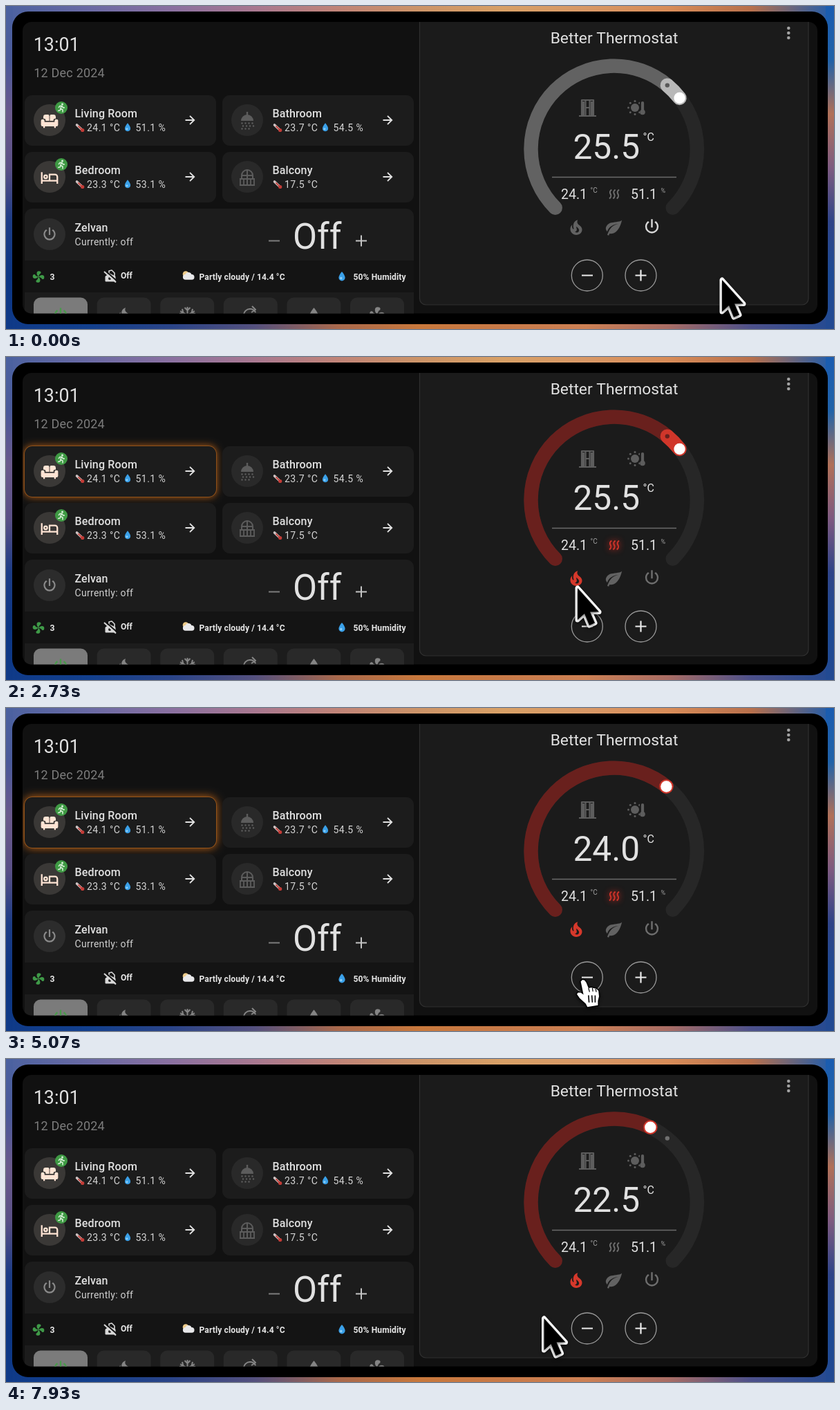
Recreate the animation shown at these times as an HTML page with a canvas. Size 1198 by 467 pixels, loop 8 s.

```html
<!DOCTYPE html>
<html lang="en">
<head>
<meta charset="utf-8">
<title>Thermostat dashboard</title>
<style>
html, body { margin: 0; width: 100%; height: 100%; overflow: hidden; background: #000; }
canvas { display: block; width: 1198px; height: 467px; }
</style>
</head>
<body>
<canvas id="stage" width="1198" height="467"></canvas>
<script>
const c = document.getElementById('stage').getContext('2d');
const LOOP = 8000, TAU = Math.PI * 2;
const HEAT_ON = 1700, HEAT_IDLE = 7000;
const CLICKS = [4060, 4480, 4900, 5310, 5720, 6150];
const CX = 879.7, CY = 206.8, R = 120.2;

const ICONS = {
  power: 'M16.56 5.44L15.11 6.89C16.84 7.94 18 9.83 18 12A6 6 0 0 1 6 12C6 9.83 7.16 7.94 8.88 6.88L7.44 5.44C5.36 6.88 4 9.28 4 12A8 8 0 0 0 20 12C20 9.28 18.64 6.88 16.56 5.44M13 3H11V13H13Z',
  fire: 'M17.66 11.2C16.9 10 13 8.5 13.2 5.2Q13.3 4 13.95 3C8.5 4.3 7.8 10 9.07 13.2C9.3 14.2 8.4 14.4 8 13.76C6.9 12.3 6.7 10.3 7.45 8.64C4.5 11 4.4 15 6 17.7C8.6 22 14.5 21.8 17 19.3C19.6 17 19.6 13.6 17.66 11.2ZM14.5 17.5C13.2 18.6 11.5 18.3 10.5 17.28C13 16.5 13 14.6 12.33 13C12.1 12 12.2 11.6 12.5 10.94C13.3 12.6 15.2 13 15.4 15C15.5 16 15.1 17 14.5 17.5Z',
  leaf: 'M17 8C8 10 5.9 16.17 3.82 21.34L5.71 22L6.66 19.7C7.14 19.87 7.64 20 8 20C19 20 22 3 22 3C21 5 14 5.25 9 6.25C4 7.25 2 11.5 2 13.5C2 15.5 3.75 17.25 3.75 17.25C7 8 17 8 17 8Z',
  bed: 'M19 7H11V15H3V5H1V20H3V17H21V20H23V11A4 4 0 0 0 19 7M7 14A3 3 0 0 0 7 8A3 3 0 0 0 7 14ZM7 12A1 1 0 0 1 7 10A1 1 0 0 1 7 12ZM21 15H13V9H19A2 2 0 0 1 21 11Z',
  sofa: 'M4 9V7Q4 4 7 4H10Q11.6 4 11.6 6V12H7V11Q7 9 4 9ZM20 9V7Q20 4 17 4H14Q12.4 4 12.4 6V12H17V11Q17 9 20 9ZM1 12Q1 10 3.2 10T5.5 12V13.5H18.5V12Q18.5 10 20.8 10T23 12V17Q23 19 21 19H20V21H18V19H6V21H4V19H3Q1 19 1 17Z',
  drop: 'M12 2C12 2 5.5 9.5 5.5 14.5A6.5 6.5 0 0 0 18.5 14.5C18.5 9.5 12 2 12 2Z',
  blade: 'M12.5 2C17 2 17.11 5.57 14.75 6.75C13.76 7.24 13.32 8.29 13.13 9.22L12 11L10.14 9.65C8.15 5.96 8.94 2 12.5 2Z',
  cloud: 'M7 20A5 5 0 0 1 6.5 10A6 6 0 0 1 17.5 10A5 5 0 0 1 18 20Z'
};
for (const k in ICONS) ICONS[k] = new Path2D(ICONS[k]);

const lerp = (a, b, k) => a + (b - a) * k;
const ramp = (t, from, to) => Math.max(0, Math.min(1, (t - from) / (to - from)));
const ease = k => k * k * (3 - 2 * k);
const mix = (a, b, k) => `rgb(${a.map((v, i) => Math.round(lerp(v, b[i], k)))})`;

function icon(name, x, y, size, color, turn = 0) {
  c.save();
  c.translate(x, y);
  c.scale(size / 24, size / 24);
  c.rotate(turn);
  c.translate(-12, -12);
  c.fillStyle = color;
  c.fill(ICONS[name], 'evenodd');
  c.restore();
}

function fan(x, y, size, color) {
  for (let i = 0; i < 4; i++) icon('blade', x, y, size, color, i * TAU / 4);
  disc(x, y, size * .05, color);
}

function text(s, x, y, size, color = '#e1e1e1', weight = 400, gap = 0, align = 'left') {
  c.font = `${weight} ${size}px Roboto, sans-serif`;
  c.letterSpacing = gap + 'px';
  c.textAlign = align;
  c.fillStyle = color;
  c.fillText(s, x, y);
}

function disc(x, y, r, color) {
  c.fillStyle = color;
  c.beginPath();
  c.arc(x, y, r, 0, TAU);
  c.fill();
}

function box(x, y, w, h, r, color) {
  c.beginPath();
  c.roundRect(x, y, w, h, r);
  c.fillStyle = color;
  c.fill();
}

// Each line is a flat list of x, y pairs.
function lines(color, width, ...list) {
  c.strokeStyle = color;
  c.lineWidth = width;
  c.beginPath();
  for (const p of list)
    for (let i = 0; i < p.length; i += 2) c[i ? 'lineTo' : 'moveTo'](p[i], p[i + 1]);
  c.stroke();
}

function poly(points, fill, stroke, width) {
  c.beginPath();
  for (let i = 0; i < points.length; i += 2) c.lineTo(points[i], points[i + 1]);
  c.closePath();
  c.lineJoin = 'round';
  c.lineWidth = width;
  c.strokeStyle = stroke;
  c.stroke();
  c.fillStyle = fill;
  c.fill();
}

function strip(x, y, w, h, colors, vertical) {
  const g = vertical ? c.createLinearGradient(0, 0, 0, 467) : c.createLinearGradient(0, 0, 1198, 0);
  colors.forEach((col, i) => g.addColorStop(i / (colors.length - 1), col));
  c.fillStyle = g;
  c.fillRect(x, y, w, h);
}

function wallpaper() {
  strip(0, 0, 600, 467, ['#4c62a0', '#4a5a9a', '#6a5a8c', '#5a5086', '#1c3c86', '#0c3684', '#0f3a88'], true);
  strip(598, 0, 600, 467, ['#1a5cb0', '#2062a8', '#b07058', '#7d5a80', '#2f4488', '#1c4a94', '#234a92'], true);
  strip(10, 0, 1176, 20, ['#4c62a0', '#6a6aa4', '#8a70a0', '#a87890', '#c08478', '#cc9468', '#d8a066', '#d89866', '#d88c58', '#b8704c', '#1c5cae']);
  strip(10, 448, 1176, 19, ['#0f3a88', '#123f8c', '#2a4488', '#54507e', '#a8684c', '#c8783c', '#c87a48', '#cc8054', '#a86c64', '#4c508a', '#234a92']);
}

function thermometer(x, y) {
  c.lineCap = 'round';
  lines('#cfc3c3', 3.6, [x - 4.5, y - 4, x + 3, y + 3]);
  lines('#c7453f', 1.8, [x - 2, y - 2, x + 3, y + 3]);
  disc(x + 3.7, y + 3.5, 2.6, '#c23b36');
  c.lineCap = 'butt';
}

function drop(x, y, size) {
  icon('drop', x, y, size, '#3aa0e8');
  disc(x - size * .07, y + size * .15, size * .1, '#8fd0f8');
}

function badge(x, y) {
  disc(x, y, 9, '#3f9a44');
  disc(x + 1.5, y - 5, 1.5, '#d8efd8');
  lines('#d8efd8', 1.5, [x - 4, y, x - 2, y - 2.5, x + 1, y - 2.5, x + 2.5, y, x + 5, y],
    [x, y - 2, x - 1, y + 1.5, x + 2, y + 3, x + 2, y + 6.5], [x - 1, y + 1.5, x - 2, y + 4, x - 5, y + 4.5]);
}

function room(x, y, name, temp, hum, lit) {
  box(x, y, 277, 73, 11, '#1c1c1c');
  disc(x + 36, y + 36, 23, lit ? '#3a3836' : '#292929');
  text(name, x + 72.5, y + 32, 16, '#e1e1e1', 500, .15);
  thermometer(x + 80, y + 47);
  text(temp + ' °C', x + 90, y + 52, 14, '#d6d6d6', 400, .45);
  if (hum) {
    drop(x + 149, y + 46.5, 15);
    text(hum + ' %', x + 160.5, y + 52, 14, '#d6d6d6', 400, .45);
  }
  if (lit) badge(x + 53, y + 18);
  const ax = x + 239, ay = y + 36;
  lines('#e1e1e1', 1.9, [ax - 6.5, ay, ax + 6, ay], [ax, ay - 6.2, ax + 6.2, ay, ax, ay + 6.2]);
}

function shower(x, y, color) {
  c.fillStyle = color;
  c.beginPath();
  c.arc(x, y + 1, 9, Math.PI, TAU);
  c.fill();
  lines(color, 2.4, [x, y - 12, x, y - 6]);
  for (let i = 0; i < 11; i++) {
    const row = Math.floor(i / 4), col = i % 4 - 1.5 + (row % 2) * .3;
    disc(x + col * 5, y + 4.5 + row * 4, 1.2, color);
  }
}

function balcony(x, y, color) {
  c.strokeStyle = color;
  c.lineWidth = 2;
  c.beginPath();
  c.moveTo(x - 8, y + 2);
  c.lineTo(x - 8, y - 3);
  c.arc(x, y - 3, 8, Math.PI, TAU);
  c.lineTo(x + 8, y + 2);
  c.stroke();
  lines(color, 2, [x, y - 11, x, y + 11], [x - 7, y - 3, x + 7, y - 3], [x - 11, y + 2, x + 11, y + 2], [x - 11, y + 11, x + 11, y + 11]);
  for (let i = -2; i <= 2; i++) lines(color, 1.8, [x + i * 5, y + 2, x + i * 5, y + 11]);
}

// Soft orange halo around the room that is being heated.
function glow(t) {
  const on = ramp(t, HEAT_ON, HEAT_ON + 150) * (1 - ramp(t, HEAT_IDLE, HEAT_IDLE + 150));
  if (!on) return;
  const pulse = .5 + .5 * Math.cos((t - 1730) / 2000 * TAU);
  c.save();
  c.globalAlpha = on * (.75 + .25 * pulse);
  c.shadowColor = '#e8781a';
  c.shadowBlur = 11 + 7 * pulse;
  box(26.3, 128.3, 278.4, 74.4, 11.5, '#b5651c');
  c.restore();
}

function leftSide(t) {
  text('13:01', 39.8, 65, 26.8);
  text('12 Dec 2024', 40.3, 103, 18, '#7c7c7c', 400, .2);
  glow(t);
  room(27, 129, 'Living Room', '24.1', '51.1', true);
  room(313, 129, 'Bathroom', '23.7', '54.5');
  room(27, 211, 'Bedroom', '23.3', '53.1', true);
  room(313, 211, 'Balcony', '17.5');
  icon('sofa', 63, 166, 27, '#ffe4d4');
  icon('bed', 63, 248, 27, '#ffe4d4');
  shower(349, 165, '#5c5c5c');
  balcony(349, 248, '#5c5c5c');

  box(27, 293, 563, 180, 11, '#1c1c1c');
  disc(63, 330, 23, '#2c2c2c');
  icon('power', 63, 330, 26, '#8a8a8a');
  text('Zelvan', 99.5, 326, 16, '#e1e1e1', 500, .1);
  text('Currently: off', 99.5, 346, 14, '#d0d0d0', 400, .3);
  text('Off', 415, 351, 51);
  lines('#7d7d7d', 2, [380, 339.5, 396, 339.5]);
  lines('#c4c4c4', 2, [506, 339.5, 522, 339.5], [514, 331.5, 514, 347.5]);

  // status row sits on a darker band
  c.fillStyle = '#141414';
  c.fillRect(27, 368, 563, 46);
  fan(47, 391.5, 20, '#3f9a48');
  text('3', 63.5, 396, 12.2, '#e6e6e6', 700);
  poly([144, 391, 150, 387, 158, 391, 158, 398, 144, 398], '#d8d8d8', '#d8d8d8', 1);
  lines('#d8d8d8', 1.6, [149, 387, 149, 383, 153, 382, 157, 386, 157, 391]);
  disc(150, 394, 2, '#222');
  lines('#141414', 2, [144, 383, 161, 398]);
  lines('#d8d8d8', 2, [142, 384, 159, 399.5]);
  text('Off', 166, 394, 12, '#e6e6e6', 700);
  disc(260, 387.5, 4.3, '#eecb8a');
  icon('cloud', 264, 389.5, 19, '#e8e8ea');
  text('Partly cloudy / 14.4 °C', 279.5, 396, 12.1, '#e6e6e6', 700, .1);
  drop(486, 391, 17);
  text('50% Humidity', 502.5, 396, 12.1, '#e6e6e6', 700, .1);

  for (let i = 0; i < 6; i++) box(40 + i * 91.6, 421.5, 78, 60, 10, i ? '#292929' : '#7b7b7b');
  icon('power', 79, 447, 28, '#4a9a4c');
  icon('fire', 171, 446, 26, '#858585');
  c.save();
  c.translate(262.5, 447);
  for (let i = 0; i < 6; i++) {
    lines('#858585', 2, [0, 0, 0, -12], [-4, -11, 0, -7, 4, -11]);
    c.rotate(TAU / 6);
  }
  c.restore();
  c.strokeStyle = '#858585';
  c.lineWidth = 2;
  c.beginPath();
  c.arc(353, 447, 9, Math.PI, TAU * .93);
  c.stroke();
  lines('#858585', 2, [356, 434, 361, 439, 355, 443]);
  icon('drop', 445.5, 447, 26, '#858585');
  fan(537, 446, 26, '#858585');
}

function arc(from, to, color, width = 20.4) {
  c.strokeStyle = color;
  c.lineWidth = width;
  c.lineCap = 'round';
  c.beginPath();
  c.arc(CX, CY, R, from, to);
  c.stroke();
  c.lineCap = 'butt';
}

const angle = temp => (-37.9 + (temp - 25.5) * 8.71) * Math.PI / 180;
const onRing = (a, r, color) => disc(CX + R * Math.cos(a), CY + R * Math.sin(a), r, color);

function dial(t, heat) {
  const shown = 25.5 - .5 * CLICKS.filter(s => t >= s).length;
  const target = angle(25.5 - .5 * CLICKS.reduce((n, s) => n + ease(ramp(t, s, s + 130)), 0));
  const now = angle(24.1), start = -1.25 * Math.PI;
  const strong = mix([184, 184, 184], [208, 54, 42], heat);
  arc(start, Math.PI / 4, '#272727');
  arc(start, Math.min(now, target), mix([98, 98, 98], [105, 32, 29], heat));
  if (target > now) arc(now, target, strong);
  else onRing(target, 10.2, strong);
  onRing(now, 3.2, target > now ? mix([88, 88, 88], [105, 32, 29], heat) : '#707070');
  onRing(target, 8.2, '#fff');

  text(shown.toFixed(1), 820.5, 221, 49.6, '#e1e1e1');
  text('°C', 921.5, 195, 16);
}

function dialIcons(t, heat) {
  const gray = '#5d5d5d';
  // window
  lines(gray, 2.2, [829, 159, 854, 159], [833, 159, 833, 136, 850, 136, 850, 159], [838.5, 136, 838.5, 159], [844.5, 136, 844.5, 159], [838.5, 147, 844.5, 147]);
  lines(gray, 3, [835.5, 138, 835.5, 158], [847.5, 138, 847.5, 158]);
  // sun and thermometer
  disc(910, 147, 6, gray);
  for (let i = 0; i < 8; i++) disc(910 + 9.5 * Math.cos(i * TAU / 8), 147 + 9.5 * Math.sin(i * TAU / 8), 1.5, gray);
  c.lineCap = 'round';
  lines('#1b1b1b', 8, [921, 140, 921, 153]);
  lines(gray, 4.2, [921, 140, 921, 152]);
  c.lineCap = 'butt';
  disc(921, 153.5, 3.8, gray);

  lines('#6b6b6b', 1.6, [790, 247.5, 970, 247.5]);
  text('24.1', 803, 279, 19.5);
  text('°C', 845.5, 270, 10, '#a0a0a0');
  text('51.1', 904, 279, 19.5);
  text('%', 947.5, 270, 9, '#a0a0a0');

  const active = heat * (1 - ramp(t, HEAT_IDLE, HEAT_IDLE + 150));
  c.save();
  c.strokeStyle = mix([112, 112, 112], [210, 52, 42], active);
  c.lineWidth = 2;
  c.shadowColor = `rgba(230,45,35,${active})`;
  c.shadowBlur = 9 * active;
  c.beginPath();
  for (let i = -1; i <= 1; i++) {
    const x = 880 + i * 5.4;
    c.moveTo(x + 1.6, 265.5);
    c.bezierCurveTo(x - 5.5, 271, x + 5.5, 272.5, x - 1.6, 278.5);
  }
  c.stroke();
  c.restore();

  icon('fire', 825, 320, 29, mix([98, 98, 98], [214, 56, 43], heat));
  icon('leaf', 879.5, 320, 28, '#626262');
  icon('power', 934.5, 319, 29, mix([216, 216, 216], [110, 110, 110], heat));

  c.strokeStyle = '#9b9b9b';
  c.lineWidth = 1.3;
  for (const x of [840.8, 918.5]) {
    c.beginPath();
    c.arc(x, 389.5, 22.5, 0, TAU);
    c.stroke();
  }
  lines('#ececec', 2.2, [833, 389.5, 849, 389.5], [910.5, 389.5, 926.5, 389.5], [918.5, 381.5, 918.5, 397.5]);
}

function rightSide(t) {
  const heat = ramp(t, HEAT_ON, HEAT_ON + 180);
  box(598.5, 0, 562.5, 432, 9, '#1b1b1b');
  c.strokeStyle = '#303030';
  c.lineWidth = 1.2;
  c.stroke();
  text('Better Thermostat', 880, 54, 22.8, '#e1e1e1', 400, 0, 'center');
  for (let i = 0; i < 3; i++) disc(1132.3, 32 + i * 7, 2.3, '#a2a2a2');
  dial(t, heat);
  dialIcons(t, heat);
}

// time, x, y, size of the pointer
const TRACK = [
  [0, 1036, 396, 1], [350, 1036, 396, 1], [1250, 832, 336, 1], [1380, 832, 336, .8],
  [1600, 832, 336, .8], [1800, 827, 334, 1], [2800, 827, 334, 1], [3500, 817, 380, 1],
  [3950, 834, 393, .8], [6350, 834, 393, .8], [7200, 778.5, 375, 1], [8000, 778.5, 375, 1]
];
const ARROW = [0, 0, 0, 46, 10, 37, 17, 54, 25, 50.5, 18, 34.5, 31, 34.5];
const HAND = [-3, 3, 0, 0, 4, 1, 7, 5, 11, 15, 16, 14, 20, 15, 25, 16, 29, 20, 30, 30, 28, 38, 28, 46, 9, 49, 6, 43, -5, 33, -10, 26, -8, 23, -3, 23, 2, 27];

function cursor(t) {
  const i = TRACK.findIndex(k => k[0] > t), a = TRACK[i - 1], b = TRACK[i];
  const k = ease(ramp(t, a[0], b[0]));
  const hand = (t > 1100 && t < 1760) || (t > 3250 && t < 6800);
  const size = lerp(a[3], b[3], k);
  c.save();
  c.translate(lerp(a[1], b[1], k), lerp(a[2], b[2], k));
  c.scale(size, size);
  c.shadowColor = 'rgba(0,0,0,.5)';
  c.shadowBlur = 4;
  c.shadowOffsetY = 2;
  if (hand) {
    poly(HAND, '#fff', '#000', 4);
    c.shadowColor = 'transparent';
    lines('#000', 2, [11, 28, 12, 41], [17, 28, 18, 41], [23, 28, 23, 41]);
    lines('#000', 1.5, [11, 15, 13, 22], [18, 15, 19, 21], [24, 16, 25, 22]);
  } else {
    poly(ARROW, '#000', '#fff', 7);
  }
  c.restore();
}

function draw(t) {
  c.lineJoin = 'miter';
  wallpaper();
  box(9, 8, 1180, 452, 23, '#000');
  c.save();
  c.beginPath();
  c.roundRect(24, 23, 1150, 421.5, 13);
  c.clip();
  c.fillStyle = '#111';
  c.fillRect(0, 0, 1198, 467);
  leftSide(t);
  rightSide(t);
  c.restore();
  cursor(t);
}

const begin = performance.now();
function tick() {
  draw((performance.now() - begin) % LOOP);
  requestAnimationFrame(tick);
}
tick();
</script>
</body>
</html>
```
